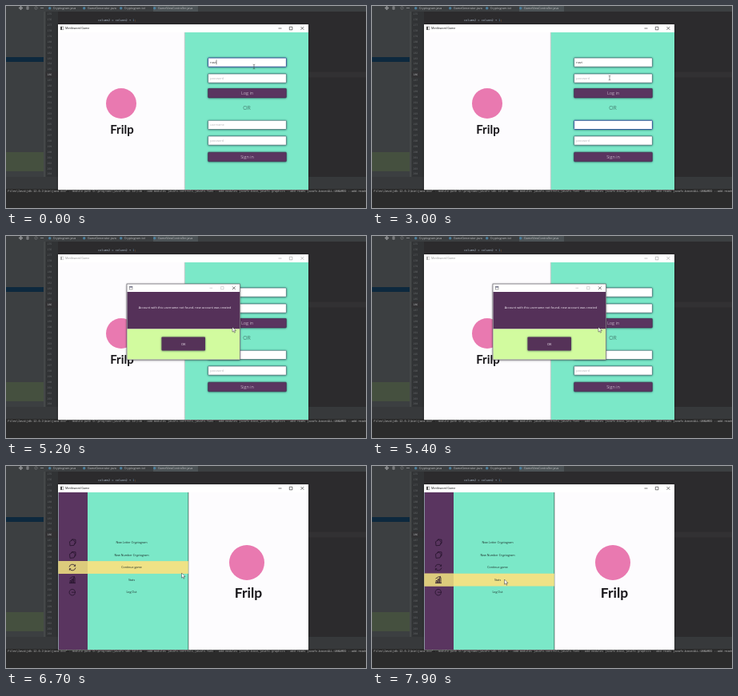
These frames come from a looping animation (450x253 px, 8000 ms). An HTML page:

```html
<!DOCTYPE html>
<html lang="en">
<head>
<meta charset="utf-8">
<title>Mottleword Game</title>
<style>
html, body { margin: 0; width: 100%; height: 100%; overflow: hidden; background: #2b2b2b; }
svg { display: block; width: 100%; height: 100%; }
text { font-family: "Open Sans", "Noto Sans", sans-serif; white-space: pre; }
.mono { font-family: "DejaVu Sans Mono", "Noto Sans Mono", monospace; }
.mark { font-family: Lato, "Open Sans", sans-serif; font-weight: 700; }
.mid { text-anchor: middle; }
.hint { font-size: 3.7px; fill: #b4b4b8; }
.entry { font-size: 3.8px; fill: #222; }
.box { fill: #fff; stroke: #2d5a5e; stroke-width: .6; }
.focus .box { stroke: #2b4f96; stroke-width: .9; }
.focus .hint { display: none; }
</style>
</head>
<body>
<svg viewBox="0 0 450 253" preserveAspectRatio="none">
  <defs>
    <filter id="soft" x="-10%" y="-40%" width="120%" height="190%">
      <feDropShadow dx="0" dy=".3" stdDeviation=".8" flood-color="#10343a" flood-opacity=".7"/>
    </filter>
    <filter id="lift" x="-10%" y="-10%" width="120%" height="120%">
      <feDropShadow dx="0" dy=".6" stdDeviation="1.4" flood-opacity=".45"/>
    </filter>
    <linearGradient id="edge"><stop offset="0" stop-opacity="0"/><stop offset="1" stop-opacity=".3"/></linearGradient>
    <linearGradient id="edgeOut"><stop offset="0" stop-opacity=".5"/><stop offset="1" stop-opacity="0"/></linearGradient>
  </defs>

  <g id="ide">
    <rect width="450" height="253" fill="#2c2b2d"/>
    <rect width="450" height="7" fill="#3c3f41"/>
    <rect x="184" width="56" height="7" fill="#4c5356"/>
    <rect y="7" width="47" height="208" fill="#3c3f41"/>
    <rect x="47" y="7" width="18" height="208" fill="#313335"/>
    <rect x="47" y="7" width="2.5" height="208" fill="#454849"/>
    <rect x="49.5" y="82.5" width="401" height="7" fill="#323133"/>
    <rect y="64" width="47" height="6" fill="#0d293e"/>
    <rect y="183" width="47" height="24" fill="#45503f"/>
    <rect y="214" width="450" height="15" fill="#37393b"/>
    <rect y="229" width="450" height="24" fill="#2b2b2b"/>
    <g fill="none" stroke="#afb1b3" stroke-width=".6">
      <circle cx="18.5" cy="2.5" r="1.8"/><path d="M18.5 0v5M16 2.5h5"/>
      <path d="M25 1.5h4M25 3.5h4M27 0v5"/>
      <circle cx="37.5" cy="2.5" r="1.6" stroke-dasharray="1 .5"/><path d="M43 2.5h4"/>
    </g>
    <g id="tabs" font-size="3.7" fill="#bbbdbf"></g>
    <text class="mono" x="115" y="18.6" font-size="3.6" fill="#a9b7c6">column2 = column2 + <tspan fill="#6897bb">1</tspan><tspan fill="#cc7832">;</tspan></text>
    <g id="lines" font-size="3.2"></g>
    <text class="mono" id="cmd" x="-2" y="233.4" font-size="3.54" fill="#bbb"></text>
  </g>

  <rect x="65" y="23" width="313" height="207.2" fill="#fff" filter="url(#lift)"/>
  <g id="bar">
    <rect x="68.3" y="26" width="3.6" height="3.8" fill="#fff" stroke="#666" stroke-width=".5"/>
    <rect x="68.3" y="26" width="1.6" height="3.8" fill="#333"/>
    <text x="74" y="29.3" font-size="3.6" fill="#111">Mottleword Game</text>
    <path d="M340.5 28h4M354.3 26.2h3.6v3.6h-3.6zM368.5 26l3.8 3.8m0-3.8l-3.8 3.8" fill="none" stroke="#222" stroke-width=".6"/>
  </g>

  <g id="login">
    <rect x="65.5" y="33" width="158.3" height="197" fill="#fdfcfe"/>
    <rect x="222.2" y="33" width="1.6" height="197" fill="url(#edge)"/>
    <rect x="223.8" y="33" width="154.2" height="197" fill="#7be8c8"/>
    <circle cx="144" cy="122" r="19" fill="#e979b0"/>
    <text class="mark mid" x="145" y="159.6" font-size="15" fill="#19171b">Frilp</text>
    <g id="form"></g>
    <text class="mid" x="301" y="129.8" font-size="7" font-weight="300" fill="#24443f">OR</text>
    <path id="caret" d="M0-3v6" stroke="#222" stroke-width=".5"/>
  </g>

  <g id="menu">
    <rect x="65.5" y="33" width="162.5" height="197" fill="#7be8c8"/>
    <rect x="65.5" y="33" width="36.5" height="197" fill="#5a3560"/>
    <rect x="228" y="33" width="150" height="197" fill="#fdfcfe"/>
    <rect x="227.4" y="33" width="1.8" height="197" fill="url(#edgeOut)"/>
    <g id="hover">
      <rect x="65.5" y="-7.9" width="162.3" height="15.8" fill="#efe286"/>
      <rect x="65.5" y="-7.9" width="36.5" height="15.8" fill="#dccb7c"/>
    </g>
    <g id="items"></g>
    <circle cx="301" cy="121" r="22" fill="#e979b0"/>
    <text class="mark mid" x="303" y="164.8" font-size="17.5" fill="#19171b">Frilp</text>
  </g>

  <g id="dialog">
    <rect x="151" y="60" width="141.5" height="95" fill="#fff" filter="url(#lift)"/>
    <rect x="154.4" y="63.2" width="3.6" height="3.8" fill="#fff" stroke="#666" stroke-width=".5"/>
    <path d="M154.4 63.9h3.6" stroke="#446" stroke-width="1"/>
    <g id="dlgButtons" fill="none" stroke-width=".6">
      <path d="M254.5 65.2h3.6M268.6 63.4h3.4v3.4h-3.4z" stroke="#bbb"/>
      <path d="M283 63.3l3.7 3.7m0-3.7l-3.7 3.7" stroke="#222"/>
    </g>
    <rect x="151.5" y="70" width="140.5" height="46.5" fill="#553159"/>
    <rect x="151.5" y="116.5" width="140.5" height="38" fill="#d2fb9f"/>
    <text class="mid" x="223.5" y="91.2" font-size="3.85" fill="#f6eef7">Account with this username not found. new account was created</text>
    <rect x="194.5" y="126.5" width="54.5" height="17" rx=".8" fill="#553159" filter="url(#soft)"/>
    <text class="mid" x="221.7" y="136.6" font-size="4" fill="#f6eef7">OK</text>
    <rect x="151" y="60" width="141.5" height="95" fill="none" stroke="#4b4650" stroke-width=".6"/>
  </g>

  <path id="arrow" d="M0 0v6.2l1.5-1.3 1 2.3 1-.45-1-2.2h2z" fill="#fff" stroke="#222" stroke-width=".45"/>
  <path id="beam" d="M-1.3-2.8q1.3 0 1.3.7q0-.7 1.3-.7M0-2.1v4.2M-1.3 2.8q1.3 0 1.3-.7q0 .7 1.3.7" fill="none" stroke="#333" stroke-width=".5"/>
</svg>
<script>
const LOOP = 8000, DIALOG = 4900, CONFIRM = 6450, MENU = 6700, TYPE = 3600;
const $ = id => document.getElementById(id);
const show = (id, on) => { $(id).style.display = on ? "" : "none"; };
const clamp = (v, lo, hi) => Math.max(lo, Math.min(hi, v));

// Editor behind the window
$("tabs").innerHTML = [[59, "Cryptogram.java"], [102, "GameGenerator.java"], [148, "Cryptogram.txt"], [190, "GameViewController.java"]]
  .map(([x, s]) => `<circle cx="${x - 4.3}" cy="2.7" r="1.7" fill="#4b7f9e"/><text x="${x}" y="3.9">${s}</text>`).join("");
$("lines").innerHTML = Array.from({ length: 30 }, (_, i) =>
  `<text class="mono" x="51.5" y="${11.3 + i * 6.9}" fill="${i === 11 ? "#b4b6b8" : "#686b6d"}">${175 + i}</text>`).join("");
$("cmd").textContent = String.raw`m Files\Java\jdk-12.0.1\bin\java.exe" --module-path D:\programs\javafx-sdk-14\lib --add-modules javafx.controls,javafx.fxml --add-modules javafx.base,javafx.graphics --add-reads javafx.base=ALL-UNNAMED --add-reads javafx.graphics=ALL-UNNAMED`;

// Login form
const fieldTops = [65, 85, 143.3, 163];
const field = (y, i) => `<g id="field${i}"><rect class="box" x="252.6" y="${y}" width="97.8" height="11.2" rx=".8" filter="url(#soft)"/>
  <text class="hint" x="255.3" y="${y + 6.9}">${i % 2 ? "password" : "username"}</text>
  <text class="entry" x="255.3" y="${y + 7}"></text></g>`;
const button = (y, label) => `<rect x="252.6" y="${y}" width="97.8" height="11.6" rx=".8" fill="#5a3560" stroke="#3a2546" stroke-width=".5" filter="url(#soft)"/>
  <text class="mid" x="301.5" y="${y + 7.7}" font-size="5.6" font-weight="300" fill="#f4eef5">${label}</text>`;
$("form").innerHTML = fieldTops.map(field).join("") + button(103.3, "Log in") + button(183.2, "Sign in");

// Menu rows
const rowY = i => 95.8 + i * 15.6;
const pages = "M-3.5-1l4-2.5 3 3-1.5 4-5 .5zM-1.5-2.5l1-1.5 4.5.5v4.5l-1.5 1";
const icons = [
  pages, pages,
  "M-3.9-.5a4 4 0 0 1 7.4-1.3M3.6-3.6v1.9h-1.9M3.9.5a4 4 0 0 1-7.4 1.3M-3.6 3.6v-1.9h1.9",
  "M-4 4h8M-3 4v-3h1.4v3M-.7 4v-5h1.4v5M1.6 4v-7h1.4v7M-3.5-1.5l3-2 3.5-.8",
  "M3.4-1.5a3.8 3.8 0 1 0 0 3M-1 0h5M2.6-1.3l1.4 1.3-1.4 1.3"
];
$("items").innerHTML = ["New Letter Cryptogram", "New Number Cryptogram", "Continue game", "Stats", "Log Out"]
  .map((s, i) => `<path d="${icons[i]}" transform="translate(83 ${rowY(i)})" fill="none" stroke="#25142b" stroke-width=".8"/>
  <text class="mid" x="157" y="${rowY(i) + 1.1}" font-size="3.6" fill="#1b2b28">${s}</text>`).join("");

// Pointer path: time, x, y
const path = [
  [0, 310, 76], [700, 310, 76], [1250, 304, 151], [2000, 304, 151], [2300, 306, 152],
  [2600, 306, 152], [3000, 297, 90], [4000, 297, 90], [4300, 284.5, 117], [4600, 284.5, 117],
  [4800, 283, 114], [5500, 283, 114], [6400, 219.5, 134], [6700, 219.5, 134],
  [7100, 197, 127], [7300, 197, 127], [7900, 165.5, 142], [LOOP, 165.5, 142]
];
const ease = p => p * p * (3 - 2 * p);
function pointer(t) {
  const i = path.findIndex(k => k[0] > t);
  const [t0, x0, y0] = path[i - 1], [t1, x1, y1] = path[i];
  const p = ease((t - t0) / (t1 - t0));
  return [x0 + (x1 - x0) * p, y0 + (y1 - y0) * p];
}

// Focused field, and when its caret started blinking
function focusAt(t) {
  if (t < 1300) return [0, -100];
  if (t < 3300) return [2, 1300];
  return t < DIALOG ? [1, 3300] : [-1, 0];
}

function draw(t) {
  const [x, y] = pointer(t);
  const menu = t >= MENU, dialog = t >= DIALOG && !menu;
  const [focus, since] = focusAt(t);
  const dots = t < TYPE ? 0 : clamp(Math.floor((t - TYPE) / 100), 1, 6);

  fieldTops.forEach((_, i) => $("field" + i).setAttribute("class", i === focus ? "focus" : ""));
  $("field0").querySelector(".entry").textContent = "novi";
  $("field0").querySelector(".hint").style.display = "none";
  $("field1").querySelector(".entry").textContent = "●".repeat(dots);
  $("field1").querySelector(".hint").style.display = dots ? "none" : "";

  const lit = focus >= 0 && Math.floor((t - since) / 500) % 2 === 0;
  show("caret", lit);
  if (lit) {
    const cx = 255.6 + $("field" + focus).querySelector(".entry").getComputedTextLength();
    $("caret").setAttribute("transform", `translate(${cx} ${fieldTops[focus] + 5.4})`);
  }

  show("login", !menu);
  show("menu", menu);
  show("dialog", dialog);
  $("dialog").style.opacity = clamp((t - DIALOG) / 150, 0, 1);
  show("dlgButtons", t < CONFIRM);
  $("bar").style.opacity = dialog && t < CONFIRM ? .45 : 1;

  const row = clamp(Math.round((y - 95.8) / 15.6), 0, 4);
  $("hover").setAttribute("transform", `translate(0 ${rowY(row)})`);

  const beam = t < DIALOG && fieldTops.some(top => y >= top && y <= top + 11.5);
  show("beam", beam);
  show("arrow", !beam);
  $(beam ? "beam" : "arrow").setAttribute("transform", `translate(${x} ${y})`);
}

const start = performance.now();
function tick(now) {
  draw(Math.max(0, now - start) % LOOP);
  requestAnimationFrame(tick);
}
draw(0);
requestAnimationFrame(tick);
</script>
</body>
</html>
```
